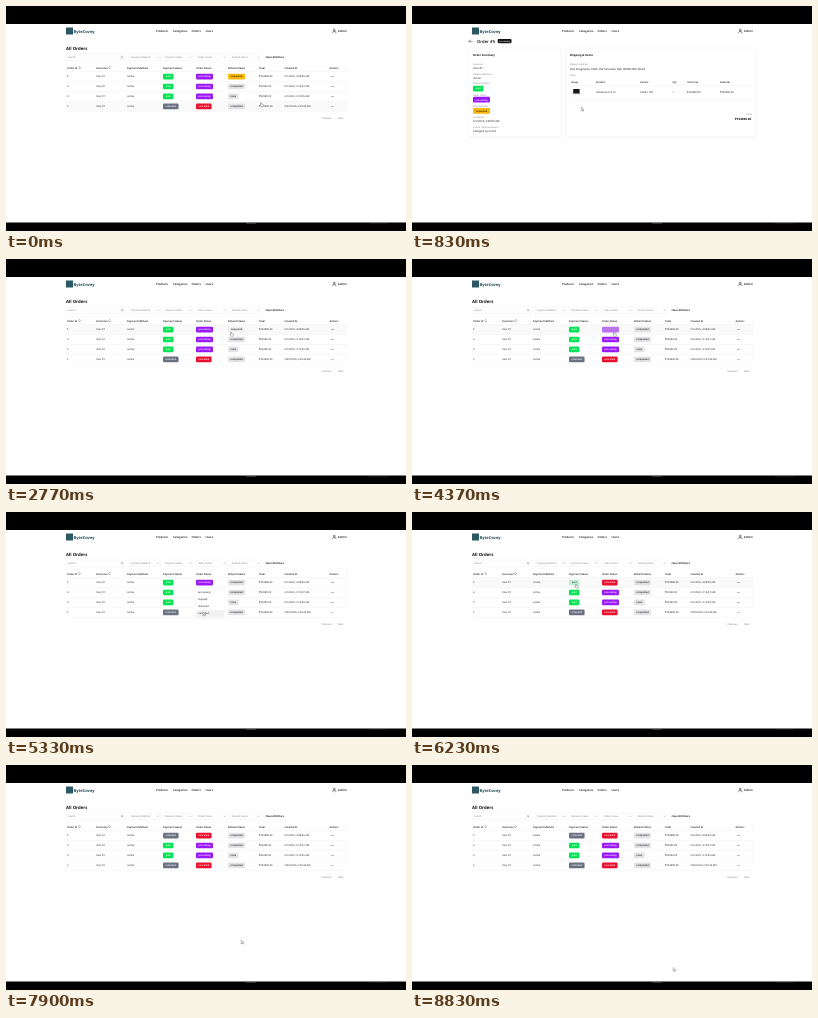
These frames come from a looping animation (400x225 px, 8.86 s). An HTML page:

```html
<!DOCTYPE html>
<html lang="en">
<head>
<meta charset="utf-8">
<title>All Orders</title>
<style>
html, body { margin: 0; width: 100%; height: 100%; overflow: hidden; background: #000; }
svg { display: block; width: 100vw; height: 100vh; }
text { font-family: "Open Sans", "Noto Sans", "DejaVu Sans", sans-serif; text-rendering: geometricPrecision; }
</style>
</head>
<body>
<svg id="stage" viewBox="0 0 400 225"></svg>
<script>
const LOOP = 8860, FADE = 150;
const INK = '#111113', GRAY = '#737379', LINE = '#ebebed', ACCENT = '#f1f1f3';
const BADGE_H = 5.7;
const stage = document.getElementById('stage');

function add(parent, tag, attrs, label) {
  const el = document.createElementNS('http://www.w3.org/2000/svg', tag);
  for (const key in attrs) el.setAttribute(key, attrs[key]);
  if (label !== undefined) el.textContent = label;
  parent.appendChild(el);
  return el;
}
const group = parent => add(parent, 'g', {});
const box = (p, x, y, width, height, fill, extra) => add(p, 'rect', { x, y, width, height, fill, ...extra });
const path = (p, d, stroke = INK, w = 0.4) =>
  add(p, 'path', { d, fill: 'none', stroke, 'stroke-width': w, 'stroke-linecap': 'round' });
const text = (p, x, y, label, size = 2.5, weight = 500, fill = INK, anchor = 'start') =>
  add(p, 'text', { x, y, 'font-size': size, 'font-weight': weight, fill, 'text-anchor': anchor }, label);
const show = (el, on) => el.setAttribute('visibility', on ? 'visible' : 'hidden');

// status: fill, text colour, badge width
const STATUS = {
  paid: ['#00e552', '#ffffff', 10.4],
  refunded: ['#6a7282', '#ffffff', 15.6],
  processing: ['#9a18f7', '#ffffff', 17],
  cancelled: ['#ea102d', '#ffffff', 15.6],
  requested: ['#f8b80c', '#18181b', 17],
  completed: ['#e3e3e6', '#18181b', 17],
  none: ['#e3e3e6', '#18181b', 10.6]
};

function mix(a, b, k) {
  const part = (hex, i) => parseInt(hex.slice(i, i + 2), 16);
  return `rgb(${[1, 3, 5].map(i => Math.round(part(a, i) + (part(b, i) - part(a, i)) * k)).join()})`;
}

function badge(parent, x, y) {
  const rect = box(parent, x, y, 1, BADGE_H, INK, { rx: 1.1 });
  const label = text(parent, x, y + 3.7, '', 2.4, 600, INK, 'middle');
  return {
    x, y,
    set(status, hover = 0) {
      const [fill, ink, w] = STATUS[status];
      rect.setAttribute('width', w);
      rect.setAttribute('fill', mix(fill, ACCENT, hover));
      label.setAttribute('x', x + w / 2);
      label.setAttribute('fill', mix(ink, INK, hover));
      label.textContent = status;
    }
  };
}

// page frame and header
box(stage, 0, 0, 400, 225, '#000');
box(stage, 0, 18, 400, 198.5, '#fff');
box(stage, 240, 217, 10, 0.8, '#444');
box(stage, 363, 217.3, 19, 0.6, '#222');
box(stage, 60, 21.5, 7, 7, '#2c5863');
text(stage, 67.6, 26.5, 'ByteCovey', 4, 700, '#1f4652');
[[150, 'Products'], [167, 'Categories'], [185.5, 'Orders'], [199.5, 'Users']]
  .forEach(([x, s]) => text(stage, x, 26.1, s, 2.8, 600));
add(stage, 'circle', { cx: 328.3, cy: 24, r: 0.9, fill: 'none', stroke: INK, 'stroke-width': 0.5 });
path(stage, 'M326.7 26.8v-.3q0-1 1-1h1.2q1 0 1 1v.3', INK, 0.5);
text(stage, 331.8, 26.1, 'Admin', 2.9, 600);

// order list
const list = group(stage);
const COLS = [61, 90, 121, 157, 190, 222, 253, 278.5, 323.5];
const rowTop = i => 65.6 + i * 9.95;
text(list, 60, 44.3, 'All Orders', 4.3, 700);

function field(x, w, label) {
  box(list, x, 48, w, 6.6, '#fff', { rx: 1, stroke: LINE, 'stroke-width': 0.4 });
  text(list, x + 2, 52.3, label, 2.4, 500, GRAY);
}
field(60, 59, 'Search');
add(list, 'circle', { cx: 115.8, cy: 51, r: 0.8, fill: 'none', stroke: GRAY, 'stroke-width': 0.35 });
path(list, 'M116.4 51.6l.7 .7', GRAY, 0.35);
[[123, 31.5, 'Payment Method'], [157, 30, 'Payment Status'], [190, 31, 'Order Status'], [224, 31, 'Refund Status']]
  .forEach(([x, w, s]) => {
    field(x, w, s);
    path(list, `M${x + w - 3.4} 51l.8 .8l.8-.8`, GRAY, 0.35);
  });
text(list, 259.5, 52.3, 'Clear All Filters', 2.45, 700);

const hovers = [0, 1, 2, 3].map(i => box(list, 60, rowTop(i), 281, 9.95, '#fafafa'));
box(list, 60, 57, 281, 48.5, 'none', { rx: 1, stroke: '#f3f3f4', 'stroke-width': 0.4 });
['Order Id', 'Customer', 'Payment Method', 'Payment Status', 'Order Status', 'Refund Status', 'Total', 'Created At', 'Actions']
  .forEach((s, i) => text(list, COLS[i], 62.6, s, 2.5, 600));
[73.6, 103.6].forEach(x => path(list, `M${x - 0.6} 61.2l.6-.7l.6 .7M${x - 0.6} 62.1l.6 .7l.6-.7`, INK, 0.35));

const ORDERS = [
  ['5', '₱104980.00', '6/1/2025, 4:08:05 AM', 'paid processing requested'],
  ['4', '₱52990.00', '6/1/2025, 3:19:07 AM', 'paid processing completed'],
  ['3', '₱52990.00', '6/1/2025, 3:10:45 AM', 'paid processing none'],
  ['2', '₱104990.00', '5/30/2025, 6:35:44 AM', 'refunded cancelled completed']
];
const rows = ORDERS.map(([id, total, date, states], i) => {
  const y = rowTop(i), base = y + 5.8;
  path(list, `M60 ${y}H341`, LINE, 0.35);
  text(list, COLS[0], base, id);
  text(list, COLS[1], base, 'User #1');
  text(list, COLS[2], base, 'online');
  text(list, COLS[6], base, total);
  text(list, COLS[7], base, date);
  [325.4, 326.6, 327.8].forEach(cx => add(list, 'circle', { cx, cy: base - 1, r: 0.33, fill: INK }));
  return { states: states.split(' '), badges: [3, 4, 5].map(c => badge(list, COLS[c], y + 2.1)) };
});
text(list, 315.5, 112.5, 'Previous', 2.5, 500, GRAY);
text(list, 332, 112.5, 'Next', 2.5, 500, GRAY);

// order details
const detail = group(stage);
function card(x, w, title) {
  box(detail, x, 42.6, w, 89, '#f3f3f4', { rx: 1.8 });
  box(detail, x, 42, w, 89, '#fff', { rx: 1.8, stroke: LINE, 'stroke-width': 0.4 });
  text(detail, x + 4, 50, title, 2.75, 700);
}
path(detail, 'M60 35.3H57M58.2 34l-1.3 1.3l1.3 1.3', INK, 0.4);
text(detail, 65, 36.8, 'Order #5', 4.2, 600);
box(detail, 85.7, 33, 13.8, 4.2, INK, { rx: 1.1 });
text(detail, 92.6, 35.8, 'processing', 2.1, 600, '#fff', 'middle');
card(57, 92, 'Order Summary');
card(153.7, 190, 'Shipping & Items');
[[59, 'Customer', 'User #1'], [68.6, 'Payment Method', 'online'], [78.2, 'Payment Status'], [89.6, 'Order Status'],
  [100.8, 'Refund Status'], [112.2, 'Created At', '6/1/2025, 4:08:05 AM'], [122, 'Cancel / Refund Reason', 'Changed my mind']]
  .forEach(([y, label, value]) => {
    text(detail, 61, y, label, 2.3, 500, GRAY);
    if (value) text(detail, 61, y + 4.2, value, 2.7);
  });
[[79.7, 'paid'], [90.8, 'processing'], [102.1, 'requested']].forEach(([y, s]) => badge(detail, 61, y).set(s));
text(detail, 158, 59, 'Delivery Address', 2.3, 500, GRAY);
text(detail, 158, 63.5, 'Rua Imaginada, 1000, Vila Serenata, MG, 00000-000, Brazil', 2.8);
text(detail, 158, 70, 'Items', 2.3, 500, GRAY);
[[159, 'Image'], [184, 'Product', 'Notebook Pro 16'], [228, 'Variant', '32GB / 1TB'], [260.5, 'Qty', '1'],
  [275, 'Unit Price', '₱104980.00'], [308, 'Subtotal', '₱104980.00']]
  .forEach(([x, head, value]) => {
    text(detail, x, 77, head, 2.4, 600);
    if (value) text(detail, x, 87, value, 2.5);
  });
path(detail, 'M158 79.6H339.5M158 94.5H339.5', LINE, 0.35);
box(detail, 161.2, 83, 6.4, 4.4, '#17171a', { rx: 0.4 });
box(detail, 160.5, 87.4, 7.8, 0.7, '#77777d');
text(detail, 339.5, 109, 'Total', 2.4, 500, GRAY, 'end');
text(detail, 339.3, 114.3, '₱104980.00', 3, 700, INK, 'end');

// status menus of the first row
const MENUS = [
  { col: 2, open: 2830, close: 3350, pick: 2, items: ['none', 'requested', 'completed', 'rejected'] },
  { col: 1, open: 4600, close: 5350, pick: 3, items: ['processing', 'shipped', 'delivered', 'cancelled'] },
  { col: 0, open: 6330, close: 6800, pick: 3, items: ['pending', 'paid', 'failed', 'refunded'] }
];
const itemTop = i => 77 + i * 7;
MENUS.forEach(menu => {
  const x = COLS[menu.col + 3] - 1;
  menu.el = group(stage);
  box(menu.el, x, 76.5, 30, 30, '#ededee', { rx: 1.3 });
  box(menu.el, x, 75.8, 30, 30, '#fff', { rx: 1.3, stroke: LINE, 'stroke-width': 0.4 });
  menu.mark = box(menu.el, x + 1, 0, 28, 6.8, '#f1f1f2', { rx: 0.8 });
  menu.items.forEach((s, i) => text(menu.el, x + 3, itemTop(i) + 4.3, s, 2.5));
});

// pointer
const arrow = add(stage, 'path', {
  d: 'M0 0V3.6L.9 2.8L1.5 4.1L2.1 3.8L1.5 2.6H2.7Z', fill: '#fff', stroke: '#444', 'stroke-width': 0.35
});
const hand = add(stage, 'path', {
  d: 'M-.4 .2Q0-.3 .4 .2V1.5L2.2 1.9Q2.7 2.1 2.5 2.9L2 4.2H.1L-1.2 2.5Q-1.1 1.9-.4 2.4Z',
  fill: '#fff', stroke: '#444', 'stroke-width': 0.35
});
const DETAIL = [450, 1850];
const PATH = [
  [0, 255, 96.5], [90, 255, 96.5], [360, 236, 72], [520, 236, 72], [900, 163, 104], [1250, 84, 112],
  [1690, 56.5, 35], [1900, 56.5, 35], [2600, 225, 73], [2880, 225, 73], [3200, 228, 93], [3700, 228, 93],
  [4370, 202, 73], [4680, 202, 73], [5100, 197, 100], [5560, 197, 100], [6200, 164, 72],
  [6380, 164, 72], [6680, 164, 100], [6830, 164, 100], [7070, 182.5, 108.5], [7400, 183, 109],
  [8120, 250, 194], [8480, 261.2, 202.5], [LOOP, 261.2, 202.5]
];

function pointer(t) {
  const i = PATH.findIndex(p => p[0] > t);
  const [t0, x0, y0] = PATH[i - 1], [t1, x1, y1] = PATH[i];
  const p = (t - t0) / (t1 - t0), k = p * p * (3 - 2 * p);
  return [x0 + (x1 - x0) * k, y0 + (y1 - y0) * k];
}
const inDetail = t => t >= DETAIL[0] && t < DETAIL[1];
const isOpen = (menu, t) => t >= menu.open && t < menu.close;
const free = t => !inDetail(t) && !MENUS.some(m => isOpen(m, t));

// share of the last moments spent over an area gives its fade level
function hover(t, hit) {
  const n = 10;
  let sum = 0;
  for (let i = 0; i < n; i++) {
    const s = Math.max(0, t - i * FADE / n);
    if (free(s) && hit(...pointer(s))) sum++;
  }
  return sum / n;
}
const overRow = i => (x, y) => x >= 60 && x <= 341 && y >= rowTop(i) && y < rowTop(i + 1);
const overBadge = (b, s) => (x, y) => x >= b.x && x <= b.x + STATUS[s][2] && y >= b.y && y <= b.y + BADGE_H;

function stateAt(row, col, t) {
  const menu = MENUS.find(m => m.col === col);
  return row === 0 && t >= menu.close ? menu.items[menu.pick] : rows[row].states[col];
}

function draw(t) {
  const [x, y] = pointer(t), away = inDetail(t);
  show(list, !away);
  show(detail, away);
  let link = away && x < 62 && y < 39;
  rows.forEach((row, i) => {
    hovers[i].setAttribute('opacity', hover(t, overRow(i)));
    if (free(t) && overRow(i)(x, y)) link = true;
    row.badges.forEach((b, col) => {
      const s = stateAt(i, col, t);
      b.set(s, hover(t, overBadge(b, s)));
    });
  });
  MENUS.forEach(menu => {
    const on = isOpen(menu, t), item = Math.floor((y - 77) / 7);
    show(menu.el, on);
    menu.el.setAttribute('opacity', Math.min(1, Math.max(0, (t - menu.open) / 100)));
    menu.mark.setAttribute('y', itemTop(Math.max(0, item)));
    menu.mark.setAttribute('opacity', item >= 0 ? 1 : 0);
  });
  [arrow, hand].forEach(el => el.setAttribute('transform', `translate(${x} ${y})`));
  show(arrow, !link);
  show(hand, link);
}

function tick() {
  draw(performance.now() % LOOP);
  requestAnimationFrame(tick);
}
tick();
</script>
</body>
</html>
```
